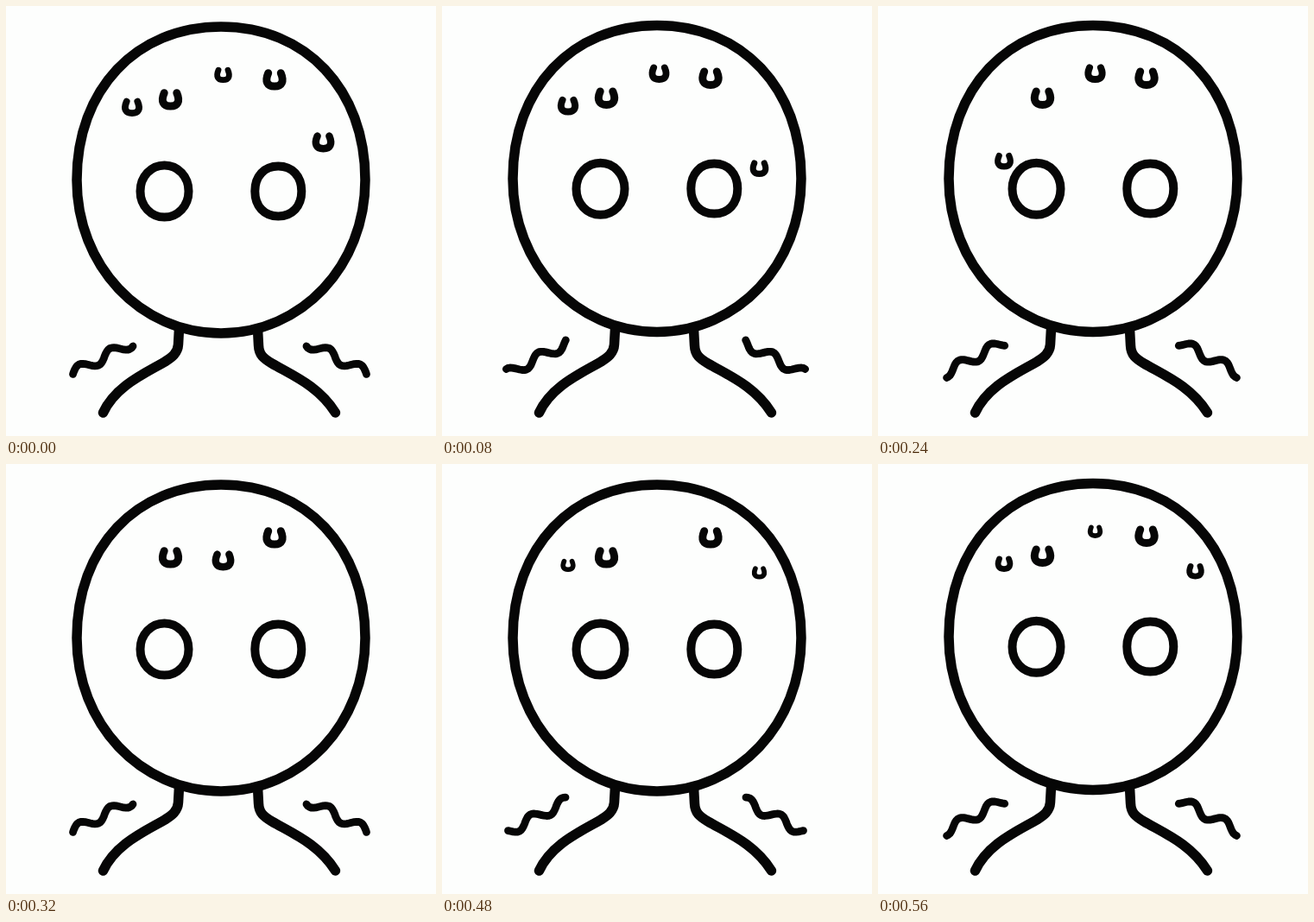
An HTML page that plays this animation: 498 px wide and 498 px high, repeating every 0.64 s.

```html
<!DOCTYPE html>
<html lang="en">
<head>
<meta charset="utf-8">
<title>Nervous face</title>
<style>
  html, body { margin: 0; width: 100%; height: 100%; overflow: hidden; background: #fdfefd; }
  svg { display: block; width: 100%; height: 100%; }
  svg * { fill: none; stroke: #060606; stroke-linecap: round; stroke-linejoin: round; }
</style>
</head>
<body>
<svg id="stage" viewBox="0 0 498 498"></svg>
<script>
const STEP = 80, STEPS = 8;
const MIRROR = 'translate(495 0) scale(-1 1)';
const stage = document.getElementById('stage');

function set(el, attrs) {
  for (const key in attrs) el.setAttribute(key, attrs[key]);
}
function path(width, d = '', parent = stage) {
  const el = document.createElementNS('http://www.w3.org/2000/svg', 'path');
  set(el, { 'stroke-width': width, d });
  return parent.appendChild(el);
}

// Oval around the origin; a fullness of 0.55 is an ellipse, more is squarer.
function oval(rx, ry, top, bottom = top) {
  const quarter = (sx, sy, k, fromSide) => fromSide
    ? `C${sx * rx} ${sy * ry * k} ${sx * rx * k} ${sy * ry} 0 ${sy * ry}`
    : `C${sx * rx * k} ${sy * ry} ${sx * rx} ${sy * ry * k} ${sx * rx} 0`;
  return `M${-rx} 0` + quarter(-1, -1, top, true) + quarter(1, -1, top, false)
    + quarter(1, 1, bottom, true) + quarter(-1, 1, bottom, false) + 'Z';
}

// A sine wave along a slanted line, running outward by a quarter period per step.
function squiggle(step) {
  const period = 36, points = [];
  for (let x = 77; x <= 145; x += 2) {
    const offset = 5.7 * Math.cos(2 * Math.PI * ((x - 105) / period + step / 4));
    const y = 426 - (x - 76) * 0.52;
    points.push(`${(x + offset * 0.46).toFixed(1)} ${(y + offset * 0.89).toFixed(1)}`);
  }
  return 'M' + points.join('L');
}

// Drops with a fall step hang, fall for two steps, rest hidden, then grow again.
const drops = [
  { x: 146, y: 117.5, fall: 2, rest: 2 },
  { x: 190.5, y: 108.5 },
  { x: 251.5, y: 80, fall: 4, rest: 1 },
  { x: 311, y: 85.5 },
  { x: 367.5, y: 126, fall: 0, rest: 4 }
];

function dropState({ fall, rest }, step) {
  if (fall === undefined) return { drop: 0, width: 27 };
  const age = (step - fall + STEPS) % STEPS;
  if (age < 2) return { drop: 32 * (age + 1), width: 25.5 - 4 * age };
  const grown = age - 2 - rest;
  return { drop: 0, width: grown < 0 ? 0 : Math.min(24, 17 + 3.3 * grown) };
}

const head = path(11.5, oval(167, 177.5, 0.59, 0.56));
const leftEye = path(10, oval(28, 30, 0.56));
const rightEye = path(10, oval(27, 29, 0.6));
path(11.5, 'M200.5 374L199.5 392C199 402 192 407 184 412C160 426 127 440 112.5 471');
path(11.5, 'M291.5 374L292.5 393C293 404 298 408 308 414C332 428 362 440 381.5 471');
const squiggles = [path(8.8), path(8.8)];
set(squiggles[1], { transform: MIRROR });
const sweat = drops.map(() =>
  path(9, 'M-7.3-7.8C-11.5 2-8.5 7.6 0 7.6S11.5 2 7.3-7.8'));

function draw(step) {
  const lift = step % 2;
  const place = (el, x, y, scale = 1) =>
    set(el, { transform: `translate(${x} ${y}) scale(${scale})` });

  place(head, 249, 201.5 - 1.5 * lift);
  place(leftEye, 183.5, 214.5 - 2.7 * lift);
  place(rightEye, 315.3, 214.5 - 2.9 * lift);
  squiggles.forEach(line => set(line, { d: squiggle(step) }));
  drops.forEach((spec, i) => {
    const { drop, width } = dropState(spec, step);
    set(sweat[i], { visibility: width ? 'visible' : 'hidden' });
    place(sweat[i], spec.x, spec.y + drop - 1.7 * lift, width / 27);
  });
}

const start = performance.now();
function tick() {
  draw(Math.floor((performance.now() - start) / STEP) % STEPS);
  requestAnimationFrame(tick);
}
tick();
</script>
</body>
</html>
```
